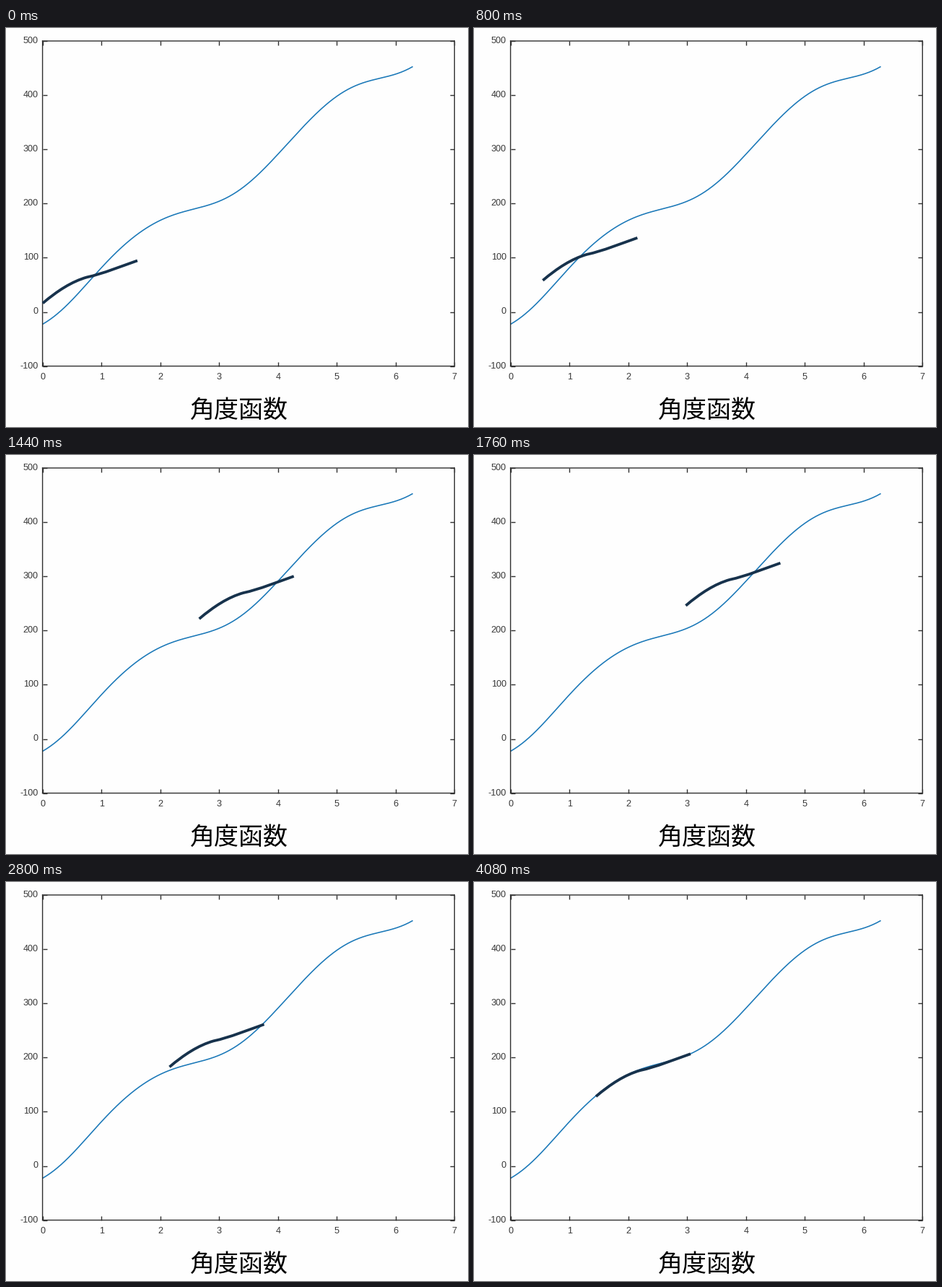
Animation of 640x553 px, one loop 4.16 s. Source, as a matplotlib script:

```python
import numpy as np
import matplotlib.pyplot as plt
from matplotlib.animation import FuncAnimation
from matplotlib.patches import PathPatch
from matplotlib.path import Path

WIDTH, HEIGHT, DPI = 640, 553, 100
STEP_MS, FRAMES = 80, 52
PX = 72 / DPI  # points per pixel
LEFT, RIGHT, TOP, BOTTOM = 50.6, 621.3, 18, 468.6
INK = "#303030"

plt.rcParams["font.family"] = "Liberation Sans"
plt.rcParams["axes.unicode_minus"] = False
fig = plt.figure(figsize=(WIDTH / DPI, HEIGHT / DPI), dpi=DPI, facecolor="#fefefe")


def angle_curve(x):
    """Steady climb with a strong twice-per-turn wobble."""
    wobble = (4.2 * np.cos(x - 0.65) - 23 * np.cos(2 * x - 0.36)
              - 1.65 * np.cos(3 * x) - np.cos(4 * x))
    return 75.6 * x - 1.9 + wobble


# Chart
ax = fig.add_axes([LEFT / WIDTH, 1 - BOTTOM / HEIGHT,
                   (RIGHT - LEFT) / WIDTH, (BOTTOM - TOP) / HEIGHT], facecolor="none")
ax.set(xlim=(0, 7), ylim=(-100, 500), xticks=range(8), yticks=range(-100, 501, 100))
ax.tick_params(direction="in", top=True, right=True, length=6 * PX, width=1.4 * PX,
               color=INK, labelcolor="#383838", labelsize=12.6 * PX)
ax.tick_params(axis="x", pad=9.5 * PX)
ax.tick_params(axis="y", pad=6 * PX)
for spine in ax.spines.values():
    spine.set(color=INK, linewidth=1.4 * PX, snap=False)
for label in ax.get_yticklabels():
    label.set_va("center")
x = np.linspace(0, 2 * np.pi, 300)
ax.plot(x, angle_curve(x), color="#1a78b8", lw=1.6 * PX)

# Pixel layer for the caption and the sliding stroke
stage = fig.add_axes([0, 0, 1, 1], facecolor="none")
stage.set(xlim=(0, WIDTH), ylim=(HEIGHT, 0))
stage.axis("off")
stage.text(322.5, 540, "角度函数", ha="center", va="baseline", color="black",
           fontsize=34 * PX, family="Noto Sans CJK JP")

STROKE = np.array([(0, 0), (20, -17), (40, -30), (61, -36),
                   (84, -41), (108, -51), (131, -59)])
CODES = [Path.MOVETO] + [Path.CURVE4] * 6
START = np.array([51, 381.4])
RISE = np.array([245, -174.5])
FALL = np.array([-127, 90.3])

stroke = stage.add_patch(PathPatch(Path(STROKE + START, CODES), fill=False, ec="#17324c",
                                   lw=3.8 * PX, capstyle="butt", joinstyle="round"))


def ease(t, center, duration):
    """Cubic ease in and out around a middle time."""
    u = np.clip((t - center) / duration + 0.5, 0, 1)
    return 4 * u ** 3 if u < 0.5 else 1 - 4 * (1 - u) ** 3


def update(frame):
    t = frame * STEP_MS
    position = START + RISE * ease(t, 1073, 1900) + FALL * ease(t, 2770, 1850)
    stroke.set_path(Path(STROKE + position, CODES))
    return (stroke,)


anim = FuncAnimation(fig, update, frames=FRAMES, interval=STEP_MS,
                     repeat=True, repeat_delay=0)
plt.show()
```
